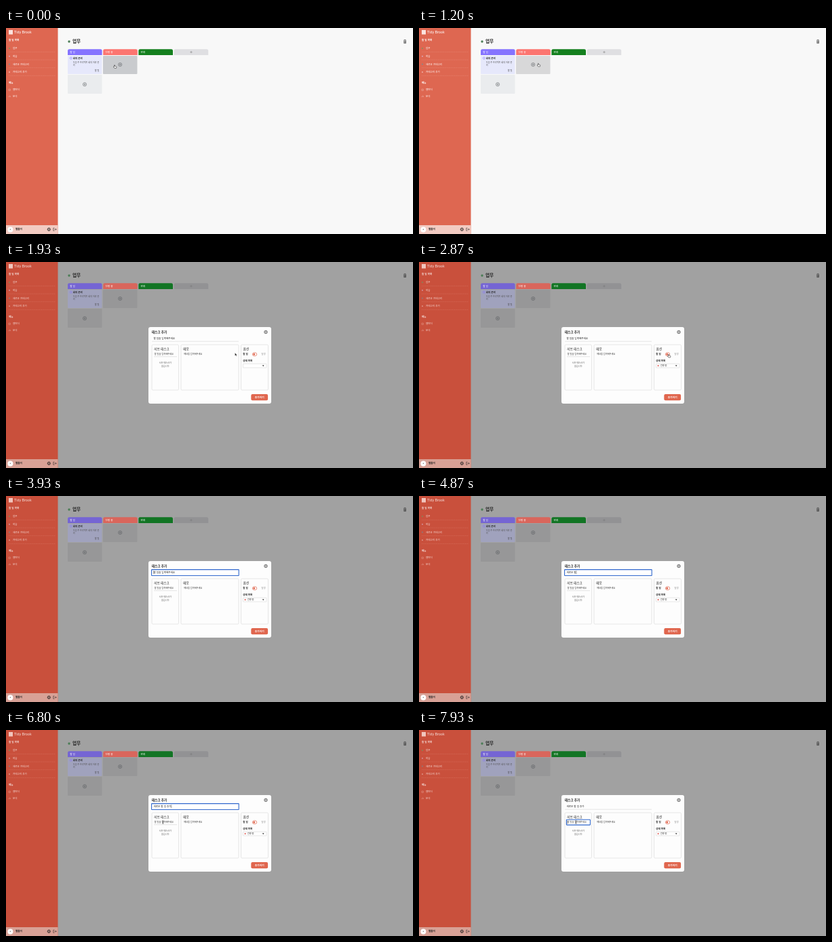
Animation of 600 by 304 pixels, one loop 8 s. Source, as an HTML page:

```html
<!DOCTYPE html>
<html lang="ko">
<head>
<meta charset="utf-8">
<title>Task board</title>
<style>
  html, body { margin: 0; width: 100%; height: 100%; overflow: hidden; background: #f8f8f8; }
  svg { display: block; width: 100vw; height: 100vh; }
  text { font-family: "Noto Sans CJK KR", "Noto Sans CJK", "Noto Sans", sans-serif; white-space: pre; }
  .brand { font-family: Lato, "Open Sans", sans-serif; }
  .main { fill: #f8f8f8; }      .dim .main { fill: #a1a1a1; }
  .side { fill: #de6751; }      .dim .side { fill: #c9503c; }
  .foot { fill: #f2cbc2; }      .dim .foot { fill: #d8a196; }
  .todo { fill: #8573ff; }      .dim .todo { fill: #7565d4; }
  .doing { fill: #fc7570; }     .dim .doing { fill: #d9665c; }
  .done { fill: #15801f; }      .dim .done { fill: #127524; }
  .more { fill: #dfdfe2; }      .dim .more { fill: #929294; }
  .card { fill: #e6e8fb; }      .dim .card { fill: #a0a2bd; }
  .slot { fill: #eaecee; }      .dim .slot { fill: #979798; }
  .hover { fill: #c9cbce; }     .dim .hover { fill: #868687; }
  .hover.soft { fill: #d8d8d9; } .dim .hover.soft { fill: #868687; }
  .dim .label { opacity: .8; }
</style>
</head>
<body>
<svg id="stage" viewBox="0 0 600 304" preserveAspectRatio="none"></svg>
<script>
const NS = 'http://www.w3.org/2000/svg';
const stage = document.getElementById('stage');
let layer = stage;

function el(tag, attrs, parent = layer) {
  const node = document.createElementNS(NS, tag);
  for (const key in attrs) node.setAttribute(key, attrs[key]);
  parent.appendChild(node);
  return node;
}
const rect = (x, y, width, height, rx, attrs) => el('rect', { x, y, width, height, rx, ...attrs });
const circle = (cx, cy, r, attrs) => el('circle', { cx, cy, r, ...attrs });
const line = (d, stroke, width = .5, attrs) =>
  el('path', { d, stroke, 'stroke-width': width, fill: 'none', ...attrs });

// Text is laid out ten times larger and scaled down; cy is its optical centre.
function text(x, cy, str, size, fill, weight = 400, attrs = {}) {
  const node = el('text', {
    transform: `translate(${x} ${cy + size * .36}) scale(.1)`,
    'font-size': size * 10, fill, 'font-weight': weight, ...attrs
  });
  node.textContent = str;
  return node;
}
function group(draw, parent = stage) {
  const before = layer;
  const node = el('g', {}, parent);
  layer = node;
  draw();
  layer = before;
  return node;
}
const show = (node, on) => node.setAttribute('visibility', on ? 'inherit' : 'hidden');

function circlePlus(x, y) {
  circle(x, y, 2.6, { fill: 'none', stroke: '#55585c', 'stroke-width': .55 });
  line(`M${x - 1.4} ${y}h2.8M${x} ${y - 1.4}v2.8`, '#55585c', .55);
}

// Sidebar
rect(0, 0, 600, 304, 0, { class: 'main' });
rect(0, 0, 76.5, 304, 0, { class: 'side' });
group(() => {
  layer.setAttribute('class', 'label');
  rect(4, 3, 6, 6.5, 0, { fill: '#fbe3de' });
  text(12, 6.3, 'Tidy Brook', 5.4, '#fff', 400, { class: 'brand' });
  text(4, 17.7, '할 일 목록', 3.65, '#fff', 700);
  ['업무', '학습', '새로운 카테고리', '카테고리 추가'].forEach((name, i) => {
    const y = 30 + i * 11.7;
    text(10, y, name, 3.6, '#fff', 500);
    line(`M4 ${y + 5.3}H73`, '#f0a596', .3, { 'stroke-dasharray': '1 .6' });
    if (i < 3) circle(5, y, .9, { fill: ['#6d9a62', '#d9b0c8', '#6d8f9a'][i] });
    else line(`M4 ${y}h2M5 ${y - 1}v2`, '#fff', .4);
  });
  text(4, 80.7, '메뉴', 3.65, '#fff', 700);
  text(10, 91.2, '캘린더', 3.6, '#fff', 500);
  text(10, 100.5, '분석', 3.6, '#fff', 500);
  line('M4 90.2h2.4v2.2h-2.4zM4 102v-1.2M5.2 102v-2.6M6.4 102v-1.8', '#f6cfc6', .4);
});
rect(0, 291, 76.5, 13, 0, { class: 'foot' });
circle(6.4, 297.4, 4, { fill: '#fff' });
circle(6.4, 297.2, .8, { fill: '#777' });
text(14, 297.2, '별돌이', 3.6, '#222', 700);
circle(63.3, 297.2, 1.8, { fill: 'none', stroke: '#222', 'stroke-width': .9 });
circle(63.3, 297.2, 2.4, { fill: 'none', stroke: '#222', 'stroke-width': .5, 'stroke-dasharray': '1 .885' });
circle(63.3, 297.2, .5, { fill: '#222' });
line('M71.4 295.2h-1.6v4h1.6M71.2 297.2h3M73 296l1.2 1.2l-1.2 1.2', '#222', .55);

// Board
circle(93, 20, 1.7, { fill: '#4b7d55' });
text(98, 19.6, '업무', 6.6, '#222', 700);
line('M586.2 18h3.8M587.3 17.4h1.6', '#333', .6);
line('M586.7 18.6v3.9h2.8v-3.9M587.7 19.2v2.7M588.6 19.2v2.7', '#333', .6);
[['todo', '할 일'], ['doing', '진행 중'], ['done', '완료'], ['more', '']].forEach(([kind, name], i) => {
  const x = 91 + i * 52.2;
  el('path', { class: kind, d: `M${x} 40v-6.5q0-2.3 2.3-2.3h46q2.3 0 2.3 2.3v6.5z` });
  if (name) text(x + 3.2, 35.6, name, 3.7, '#fff', 500);
  else line(`M${x + 23.7} 35.6h3.4M${x + 25.4} 33.9v3.4`, '#777', .5);
});
rect(91, 41, 50.5, 27, 1, { class: 'card' });
circle(95.8, 44.5, 1.5, { fill: 'none', stroke: '#8573ff', 'stroke-width': .6 });
text(98.8, 44.4, '회의 준비', 3.5, '#222', 700);
text(98.8, 50.4, '다음 주 프로젝트 회의 자료 준', 3.1, '#555');
text(98.8, 54.4, '비', 3.1, '#555');
text(130.8, 63.2, '할 일', 3.2, '#444');
rect(91, 69, 50.5, 28, 1, { class: 'slot' });
const slot = rect(143, 41, 50.5, 27, 1, { class: 'hover' });
circlePlus(116, 83.2);
circlePlus(168.2, 54);

// Dialog
const ui = {};
function panel(x, width, title) {
  rect(x, 122, width, 67, 1.5, { fill: '#fdfdfd', stroke: '#cfcfcf', 'stroke-width': .5 });
  text(x + 3.2, 128.2, title, 4.6, '#222', 500);
}
const focusRing = (x, y, w, h) =>
  rect(x, y, w, h, .5, { fill: '#fff', stroke: '#3168cd', 'stroke-width': 1.1 });
const caretBar = (x, y) => line(`M0 0v5`, '#111', .4, { transform: `translate(${x} ${y})` });

const dialog = group(() => {
  rect(210, 96, 181, 113, 3, { fill: '#fdfdfd' });
  text(214.8, 103, '태스크 추가', 4.6, '#222', 700);
  circle(383, 103.4, 2.2, { fill: 'none', stroke: '#222', 'stroke-width': .7 });
  line('M382.1 102.5l1.8 1.8M383.9 102.5l-1.8 1.8', '#222', .6);

  line('M215 117.2H343', '#ccc', .5);
  ui.titleRing = focusRing(214.6, 108.6, 128.6, 8.9);
  ui.title = text(217.4, 112.7, '', 3.6, '#222', 500);
  ui.titleCaret = caretBar(217.4, 110.3);

  panel(215, 39.5, '서브 태스크');
  line('M218 139.7H252', '#ccc', .5);
  ui.subRing = focusRing(217.4, 132.2, 35, 7.9);
  text(218.7, 136.1, '할 일을 입력해주세요', 3.2, '#333', 500);
  ui.subCaret = caretBar(218.8, 133.7);
  text(234.8, 149.2, '서브 태스크가', 3.1, '#555', 400, { 'text-anchor': 'middle' });
  text(234.8, 153.5, '없습니다', 3.1, '#555', 400, { 'text-anchor': 'middle' });

  panel(258, 85, '메모');
  text(262.3, 136.1, '메모를 입력해주세요', 3.15, '#333', 500);

  panel(346.5, 40, '옵션');
  text(349.2, 136.1, '할 일', 3.5, '#222', 700);
  rect(363.4, 133.8, 6.3, 4.8, 2.4, { fill: '#fff', stroke: '#e0664e', 'stroke-width': .7 });
  circle(365.8, 136.2, 1.4, { fill: '#e0664e' });
  text(376.2, 136.1, '일정', 3.5, '#888');
  text(349.2, 145.4, '상태 목록', 3.6, '#222', 700);
  rect(349.4, 150.2, 34.6, 5.8, .6, { fill: '#fff', stroke: '#ccc', 'stroke-width': .5 });
  el('path', { d: 'M377.9 152.3h2.6l-1.3 1.9z', fill: '#333' });
  ui.status = group(() => {
    circle(352.6, 153.1, 1.1, { fill: '#e5655f' });
    text(355.9, 153, '진행 중', 3.1, '#222', 500);
  }, layer);
  ui.list = group(() => {
    rect(349.4, 156.4, 34.6, 19, .8, { fill: '#fff', stroke: '#ccc', 'stroke-width': .5 });
    [['todo', '할 일'], ['doing', '진행 중'], ['done', '완료']].forEach(([kind, name], i) => {
      const y = 160 + i * 6;
      circle(352.6, y, 1.1, { class: kind });
      text(355.9, y, name, 3.1, '#222', 500);
    });
  }, layer);

  rect(361.3, 195, 24.8, 9.2, 2, { fill: '#e0664e' });
  text(366.8, 199.6, '추가하기', 3.75, '#fff', 700);
});

// Pointers, each drawn around its hot spot
const pointers = {
  hand: group(() => el('path', {
    d: 'M-.5 .4q.5-.7 1 0v1.5l2 .5q.5.2.4.8l-.4 1.7h-2.6l-1.6-2q.2-.6 1.2 0z',
    fill: '#fff', stroke: '#111', 'stroke-width': .5, 'stroke-linejoin': 'round'
  })),
  arrow: group(() => el('path', {
    d: 'M0 0v4l1-.9l.7 1.6l.7-.3l-.7-1.5h1.3z', fill: '#111', stroke: '#fff', 'stroke-width': .25
  })),
  beam: group(() => line('M-.8-2.4q.8 0 .8.6v3.6q0 .6-.8.6M.8-2.4q-.8 0-.8.6v3.6q0 .6.8.6', '#222', .45))
};

// Pointer path: time, x, y
const path = [
  [0, 160, 54.4], [70, 160, 54.4], [870, 175.8, 52], [1270, 175.8, 52], [1730, 296, 130.5],
  [1930, 350.5, 135.5], [2130, 366, 152], [2270, 366, 152], [2530, 362, 165], [2600, 362, 165],
  [2870, 368, 136], [2930, 368, 136], [3670, 242, 113.3], [6200, 242, 113.3], [6800, 231.5, 136],
  [8000, 231.5, 136]
];
function pointerAt(t) {
  const i = Math.max(1, path.findIndex(p => p[0] > t));
  const [t0, x0, y0] = path[i - 1], [t1, x1, y1] = path[i];
  const u = (t - t0) / (t1 - t0), e = u * u * (3 - 2 * u);
  return [x0 + (x1 - x0) * e, y0 + (y1 - y0) * e];
}
function pointerKind(t, x, y) {
  if (t < 1250) return 'hand';
  if (t > 3800 && t < 5790) return null;
  const inTitle = x > 215 && x < 343 && y > 108 && y < 118;
  const inSub = x > 217 && x < 253 && y > 132 && y < 141;
  if (inTitle || inSub) return 'beam';
  return x > 349 ? 'hand' : 'arrow';
}

// Hangul input, syllable by syllable
const typed = [];
let fixed = '';
for (const steps of ['ㅅ 새 샐', '새로 새롱', '새로우 새로운', '새로운_ 새로운_ㅎ 새로운_하 새로운_할',
  '+_ +_ㅇ +_이 +_일', '+_ +_ㅊ +_추 +_축 +_추가']) {
  const words = steps.split(' ').map(s => s.replace('+', fixed).replace(/_/g, ' '));
  typed.push(...words);
  fixed = words[words.length - 1];
}
function titleAt(t) {
  const i = t < 5000 ? Math.min(10, Math.floor((t - 3920) / 94))
                     : Math.min(19, 11 + Math.floor((t - 4990) / 92));
  return i < 0 ? '' : typed[i];
}

const TICK = 200 / 3;
function render(now) {
  const t = Math.floor((now % 8000) / TICK + 1e-6) * TICK;
  const open = t > 1250;
  stage.setAttribute('class', open ? 'dim' : '');
  slot.setAttribute('class', t > 1700 ? 'slot' : t > 925 ? 'hover soft' : 'hover');
  show(dialog, open);

  const titleFocus = t > 3650 && t < 6900, subFocus = t > 6900;
  const value = titleAt(t);
  ui.title.textContent = value || '할 일을 입력해주세요';
  show(ui.titleRing, titleFocus);
  const width = value ? ui.title.getComputedTextLength() * .1 : 0;
  ui.titleCaret.setAttribute('transform', `translate(${217.4 + width + .3} 110.3)`);
  show(ui.titleCaret, titleFocus && (t < 6190 || t > 6700));
  show(ui.subRing, subFocus);
  show(ui.subCaret, subFocus && (t < 7460 || t > 7860));
  show(ui.status, t > 2590);
  show(ui.list, t > 2190 && t < 2590);

  const [x, y] = pointerAt(t);
  const kind = pointerKind(t, x, y);
  for (const name in pointers) {
    show(pointers[name], name === kind);
    pointers[name].setAttribute('transform', `translate(${x} ${y})`);
  }
}

let start = null;
function loop(now) {
  if (start === null) start = now;
  render(now - start);
  requestAnimationFrame(loop);
}
render(0);
requestAnimationFrame(loop);
</script>
</body>
</html>
```
